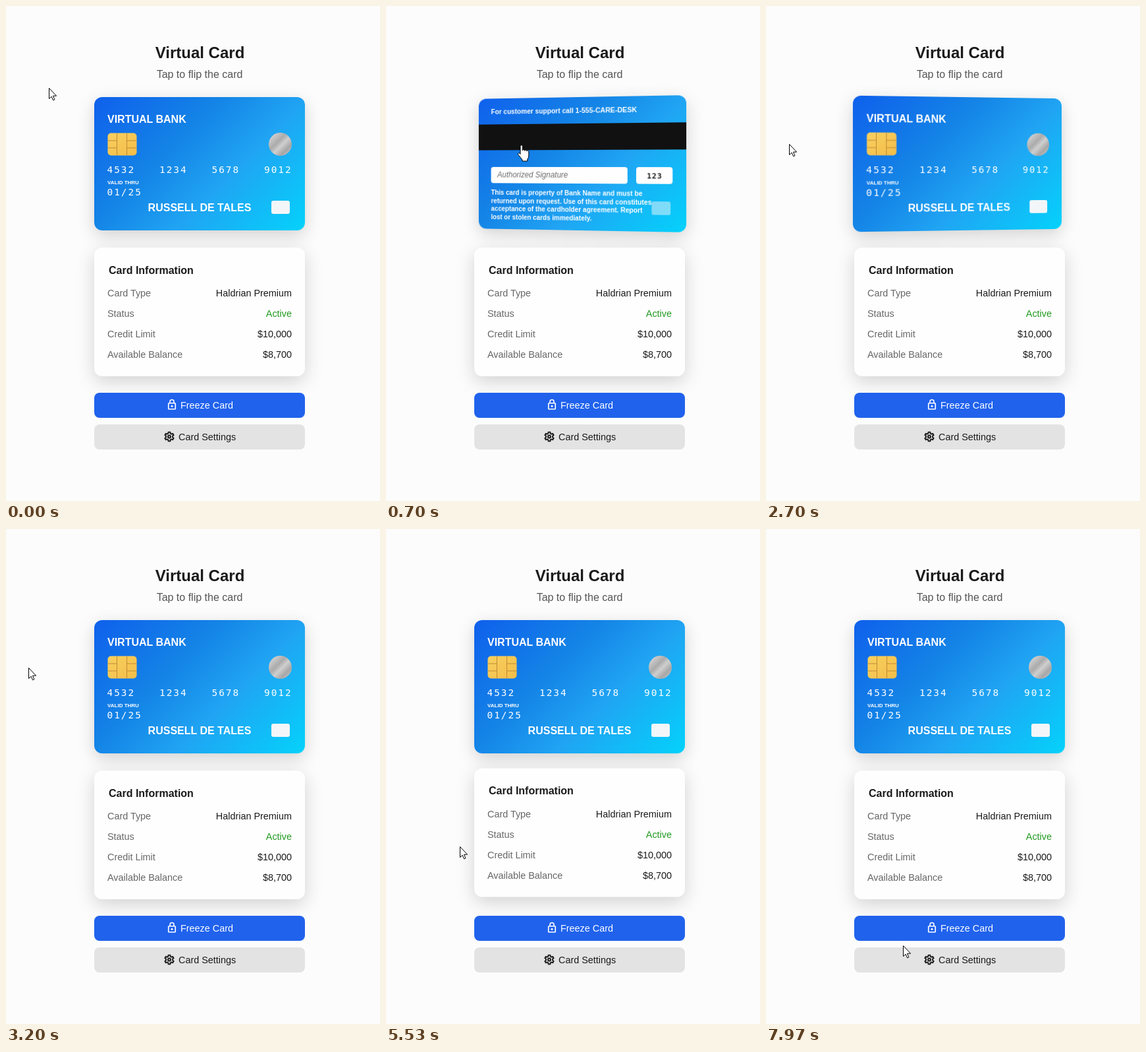
Recreate the animation shown at these times as an HTML page. Size 568 by 750 pixels, loop 8 s.

```html
<!DOCTYPE html>
<html lang="en">
<head>
<meta charset="utf-8">
<title>Virtual Card</title>
<style>
  html, body { margin: 0; width: 100%; height: 100%; overflow: hidden; background: #fcfcfc; }
  body { position: relative; }
  .box { position: absolute; left: 134px; width: 320px; }
  .face { top: 138px; height: 202px; border-radius: 12px; box-shadow: 0 8px 26px rgba(0, 0, 0, .17);
    background: linear-gradient(135deg, #0f60ec 0%, #1484e6 37%, #20a4f3 62%, #04d2fb 100%); }
  .info { top: 366px; height: 195px; border-radius: 12px; background: #fefefe;
    box-shadow: 0 8px 28px rgba(0, 0, 0, .17); }
  .button { height: 38px; border-radius: 8px; }
  #freeze { top: 586px; }
  #settings { top: 634px; background: #e3e3e4; }
  svg { position: absolute; left: 0; top: 0; width: 100%; height: 100%; display: block; }
  text { font-family: "Liberation Sans", Arial, sans-serif; font-size: 14.4px; fill: #1a1a1a; }
  .bold { font-weight: bold; font-size: 16px; }
  .label { fill: #666; }
  .end { text-anchor: end; }
  .mid { text-anchor: middle; }
  .face text { fill: #fff; }
  .face .mono { font-family: "DejaVu Sans Mono", monospace; letter-spacing: 2px; }
  .face .small { font-weight: bold; font-size: 10.25px; }
</style>
</head>
<body>
<svg viewBox="0 0 568 750">
  <text class="bold mid" x="294.5" y="79" style="font-size:24px">Virtual Card</text>
  <text class="mid" x="294" y="109" style="font-size:16px;fill:#555">Tap to flip the card</text>
</svg>

<div class="box face" id="front">
  <svg viewBox="134 138 320 202">
    <defs>
      <linearGradient id="gold" x2="1" y2="1">
        <stop stop-color="#f8d060"/><stop offset="1" stop-color="#f3bd48"/>
      </linearGradient>
      <linearGradient id="foil" x2="1" y2="1">
        <stop offset=".1" stop-color="#d4d4d4"/><stop offset=".4" stop-color="#ababab"/>
        <stop offset=".55" stop-color="#cfcfcf"/><stop offset=".75" stop-color="#a6a6a6"/>
        <stop offset="1" stop-color="#d2d2d2"/>
      </linearGradient>
    </defs>
    <text class="bold" x="154" y="177">VIRTUAL BANK</text>
    <rect x="154.5" y="192.5" width="44" height="34" rx="5" fill="url(#gold)"/>
    <path d="M168.5 193V226M183.5 193V226M155 204H168.5M155 215H168.5M183.5 204H198M183.5 215H198"
      fill="none" stroke="#c08a35"/>
    <circle cx="416.5" cy="209.5" r="17.5" fill="url(#foil)"/>
    <g id="digits"></g>
    <text class="bold" x="154" y="270" style="font-size:8px">VALID THRU</text>
    <text class="mono" x="153.5" y="287">01/25</text>
    <text class="bold mid" x="294" y="311">RUSSELL DE TALES</text>
    <rect x="403" y="295" width="28" height="20" rx="3" fill="#f2f6f8"/>
  </svg>
</div>

<div class="box face" id="back">
  <svg viewBox="134 138 320 202">
    <text class="small" x="154" y="162.5" style="font-size:10.6px">For customer support call 1-555-CARE-DESK</text>
    <rect x="134" y="178" width="320" height="40" fill="#111"/>
    <rect x="154" y="244" width="213" height="25" rx="4" fill="#fefefe"/>
    <text x="164" y="260.5" style="font-size:12px;font-style:italic;fill:#6c6c6c">Authorized Signature</text>
    <rect x="380" y="244" width="54" height="25" rx="4" fill="#fefefe"/>
    <text class="mono mid" x="407.5" y="261" style="font-size:11.2px;font-weight:bold;letter-spacing:1px;fill:#1a1a1a">123</text>
    <rect x="403" y="295" width="28" height="20" rx="3" fill="#f2f6f8" opacity=".5"/>
    <g id="terms"></g>
  </svg>
</div>

<div class="box info" id="info">
  <svg viewBox="134 366 320 195">
    <text class="bold" x="156" y="405.5">Card Information</text>
    <g id="rows"></g>
  </svg>
</div>

<div class="box button" id="freeze">
  <svg viewBox="134 586 320 38">
    <g transform="translate(243 595) scale(.75)" fill="none" stroke="#fff" stroke-width="2.2">
      <rect x="5" y="9" width="14" height="12" rx="1"/>
      <path d="M8 9V6a4 4 0 0 1 8 0v3"/>
      <circle cx="12" cy="15" r="2" fill="#fff" stroke="none"/>
    </g>
    <text x="265" y="610" style="fill:#fff">Freeze Card</text>
  </svg>
</div>

<div class="box button" id="settings">
  <svg viewBox="134 634 320 38">
    <g transform="translate(248 652.5)" fill="none" stroke="#1a1a1a" stroke-linejoin="round">
      <path id="gear" stroke-width="1.9"/>
      <circle r="2" stroke-width="1.9"/>
    </g>
    <text x="262" y="658">Card Settings</text>
  </svg>
</div>

<svg viewBox="0 0 568 750">
  <g id="cursor" fill="#fff" stroke="#000" stroke-linejoin="round">
    <path id="arrow" d="M-.5 .5V16.5L3.1 13.2L5.6 18.8L7.9 17.8L5.5 12.2H10.6Z"/>
    <path id="hand" d="M-2 13V1.5a1.7 1.7 0 0 1 3.4 0V8a1.6 1.6 0 0 1 3.2 .4a1.6 1.6 0 0 1 3.2 .6a1.5 1.5 0 0 1 3 .8V16q0 3-2 5v3H1v-2L-5 14.5q-1.5-2 .3-2.7q1.2-.3 2.7 1.7z"/>
  </g>
</svg>

<script>
const LOOP = 8000;
const $ = id => document.getElementById(id);

const text = (x, y, cls, str, fill = '') =>
  `<text class="${cls}" x="${x}" y="${y}"${fill && ` style="fill:${fill}"`}>${str}</text>`;

$('digits').innerHTML = ['4532', '1234', '5678', '9012']
  .map((s, i) => text(153.5 + 79.5 * i, 253, 'mono', s)).join('');

$('terms').innerHTML = [
  'This card is property of Bank Name and must be',
  'returned upon request. Use of this card constitutes',
  'acceptance of the cardholder agreement. Report',
  'lost or stolen cards immediately.'
].map((s, i) => text(154, 287.5 + 12.4 * i, 'small', s)).join('');

$('rows').innerHTML = [
  ['Card Type', 'Haldrian Premium'],
  ['Status', 'Active', '#229a22'],
  ['Credit Limit', '$10,000'],
  ['Available Balance', '$8,700']
].map(([name, value, fill], i) => {
  const y = 440 + 31 * i;
  return text(154, y, 'label', name) + text(434, y, 'end', value, fill);
}).join('');

// Six teeth, four corners each
const gearPoints = Array.from({ length: 24 }, (_, i) => {
  const outer = i % 4 < 2;
  const a = (Math.floor(i / 4) + [-.2, .2, .32, .68][i % 4]) * Math.PI / 3 - Math.PI / 2;
  const r = outer ? 7 : 5.1;
  return (r * Math.cos(a)).toFixed(2) + ' ' + (r * Math.sin(a)).toFixed(2);
});
$('gear').setAttribute('d', 'M' + gearPoints.join('L') + 'Z');

// CSS "ease" curve: cubic-bezier(.25, .1, .25, 1)
function ease(x) {
  if (x <= 0) return 0;
  if (x >= 1) return 1;
  let lo = 0, hi = 1;
  for (let i = 0; i < 24; i++) {
    const s = (lo + hi) / 2;
    if (.75 * s * (1 - s) + s ** 3 < x) lo = s; else hi = s;
  }
  const s = lo, r = 1 - s;
  return .3 * s * r * r + 3 * s * s * r + s ** 3;
}

const hover = (t, enter, leave, span) => ease((t - enter) / span) - ease((t - leave) / span);

// Pointer path: time, x, y
const path = [
  [0, 65, 124], [136, 134, 155], [400, 185, 198], [700, 206, 211], [830, 208, 213],
  [2000, 208, 213], [2112, 133, 212], [2170, 116, 211], [2700, 36, 209],
  [3199, 36, 209], [3200, 35, 210], [3800, 35, 210], [3960, 136, 385], [4170, 214, 501],
  [4400, 218, 506], [4870, 218, 506], [5470, 133, 486], [5530, 113, 481], [5670, 74, 476],
  [6070, 40, 500], [6370, 40, 500], [6500, 150, 600], [6730, 184, 616],
  [7199, 184, 616], [7200, 188, 621], [7570, 188, 621], [7660, 191, 625], [7970, 209, 631], [8000, 209, 631]
];

function pointer(t) {
  const i = path.findIndex(p => p[0] > t);
  const [t0, x0, y0] = path[i - 1], [t1, x1, y1] = path[i];
  const k = (t - t0) / (t1 - t0);
  return [x0 + (x1 - x0) * k, y0 + (y1 - y0) * k];
}

const clickable = (x, y) => x >= 134 && x <= 454 &&
  ((y >= 138 && y <= 340) || (y >= 361 && y <= 561) || (y >= 586 && y <= 624));

function turn(face, angle) {
  face.style.visibility = Math.cos(angle * Math.PI / 180) > 0 ? 'visible' : 'hidden';
  face.style.transform = angle % 360 ? `perspective(1000px) rotateY(${angle}deg)` : 'none';
}

function draw(now) {
  let t = now % LOOP;
  if (t > 2170 && t < 2700) t = 2170; // the picture pauses here

  const angle = 180 * hover(t, 136, 2112, 800);
  turn($('front'), angle);
  turn($('back'), angle + 180);

  const lift = 5 * hover(t, 3960, 5470, 300);
  $('info').style.transform = lift ? `translateY(${-lift}px)` : 'none';

  const k = hover(t, 6500, 7660, 300);
  const mix = (a, b) => Math.round(a + (b - a) * k);
  $('freeze').style.background = `rgb(${mix(32, 29)},${mix(98, 76)},${mix(236, 216)})`;

  const [x, y] = pointer(t);
  const over = clickable(x, y);
  $('cursor').setAttribute('transform', `translate(${Math.round(x)} ${Math.round(y)})`);
  $('hand').style.display = over ? '' : 'none';
  $('arrow').style.display = over ? 'none' : '';
}

const start = performance.now();
function tick() {
  draw(performance.now() - start);
  requestAnimationFrame(tick);
}
tick();
</script>
</body>
</html>
```
